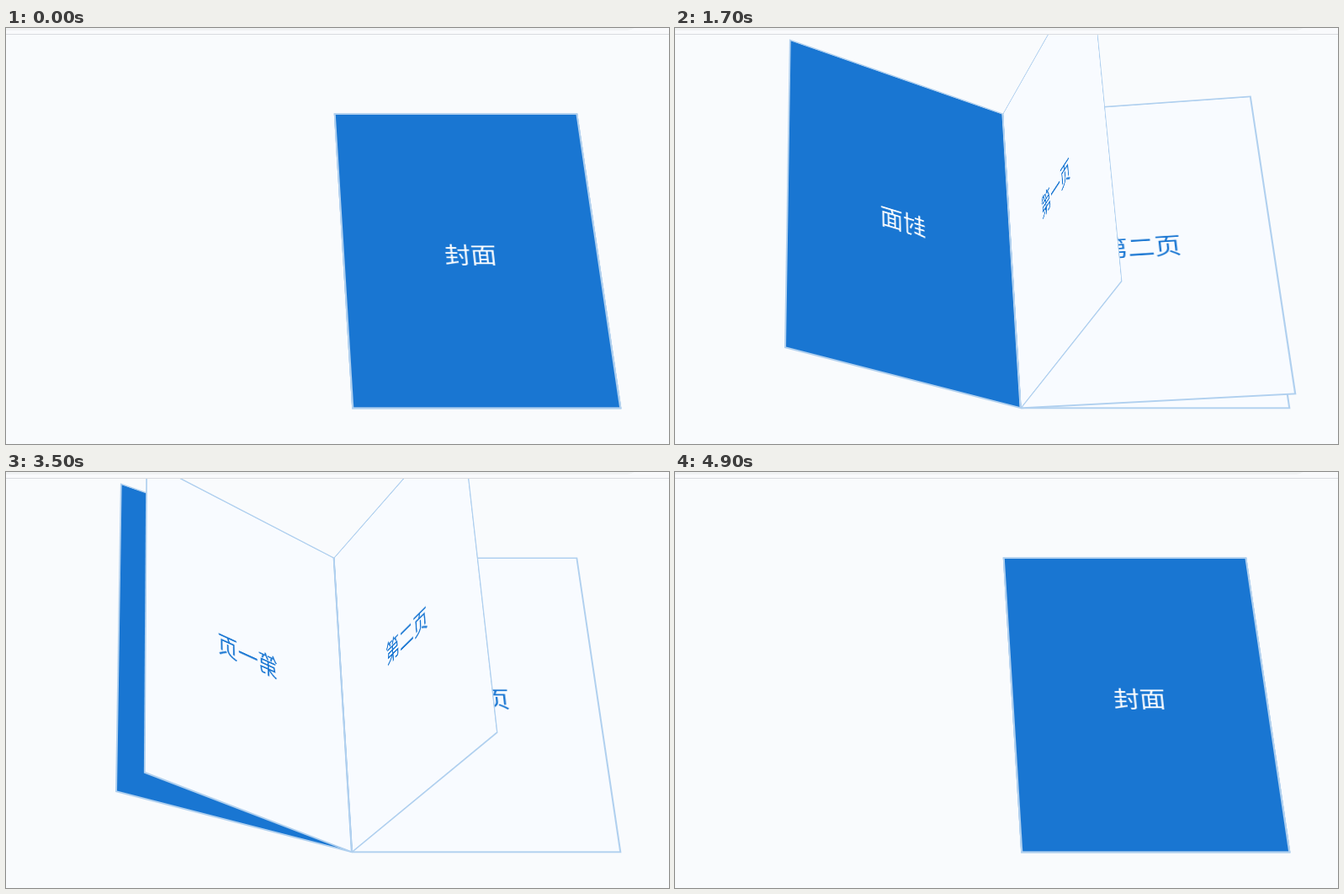
Write an HTML page that moves like this. It is 788 px wide and 494 px high and loops after 5600 ms.

```html
<!DOCTYPE html>
<html lang="zh-CN">
<head>
<meta charset="utf-8">
<title>翻页</title>
<style>
  html, body { margin: 0; width: 100%; height: 100%; overflow: hidden; background: #f9fbfd; }
  .bar { position: absolute; inset: 0 0 auto 0; height: 8px; box-sizing: border-box;
    overflow: hidden; background: #f9fafc; border-bottom: 1px solid #dadce0; }
  .bar::before { content: ""; position: absolute; left: -60px; top: -25px; width: 812px; height: 28px;
    border-radius: 14px; background: #f1f3f4; }
  .scene { position: absolute; left: 0; top: 0; width: 788px; height: 494px; overflow: hidden;
    clip-path: inset(8px 0 0 0); perspective: 2000px; perspective-origin: 188px 267.5px; }
  .page { position: absolute; left: 399.75px; top: 65.5px; width: 304px; height: 404px;
    box-sizing: border-box; border: 2px solid #b0d0ef; background: #f8fbff; color: #1976d2;
    transform-origin: left center; text-align: center;
    font: 350 31px/400px "Noto Sans CJK SC", "Noto Sans CJK", sans-serif; }
  .cover { background: #1976d2; color: #fff; }
</style>
</head>
<body>
<div class="scene" id="scene"></div>
<div class="bar"></div>
<script>
const LOOP = 5600, STEP = 100;
const OPENING = 913, CLOSING = 928;
const FACING = 97; // sheet angle that points at the viewer

const sheets = [
  { text: '封面', angle: 150, open: 743, close: 3972 },
  { text: '第一页', angle: 140, open: 1200, close: 3503 },
  { text: '第二页', angle: 130, open: 1650, close: 3054 },
  { text: '第三页', angle: 0, open: 0, close: 0 }
];

const scene = document.getElementById('scene');
sheets.forEach((sheet, i) => {
  sheet.el = document.createElement('div');
  sheet.el.className = i ? 'page' : 'page cover';
  sheet.el.textContent = sheet.text;
  scene.append(sheet.el);
});

const progress = (t, start, span) => Math.min(1, Math.max(0, (t - start) / span));

function draw(t) {
  sheets.forEach((sheet, i) => {
    const turned = progress(t, sheet.open, OPENING) - progress(t, sheet.close, CLOSING);
    const angle = sheet.angle * turned;
    sheet.el.style.transform = `rotateX(30deg) rotateY(${-angle}deg)`;
    // nearest to the viewer goes on top; at rest the cover wins
    sheet.el.style.zIndex = Math.round(200 - Math.abs(angle - FACING)) * 4 + 3 - i;
  });
}

const start = performance.now();
function tick() {
  const t = (performance.now() - start) % LOOP;
  draw(Math.floor(t / STEP) * STEP);
  requestAnimationFrame(tick);
}
draw(0);
requestAnimationFrame(tick);
</script>
</body>
</html>
```
